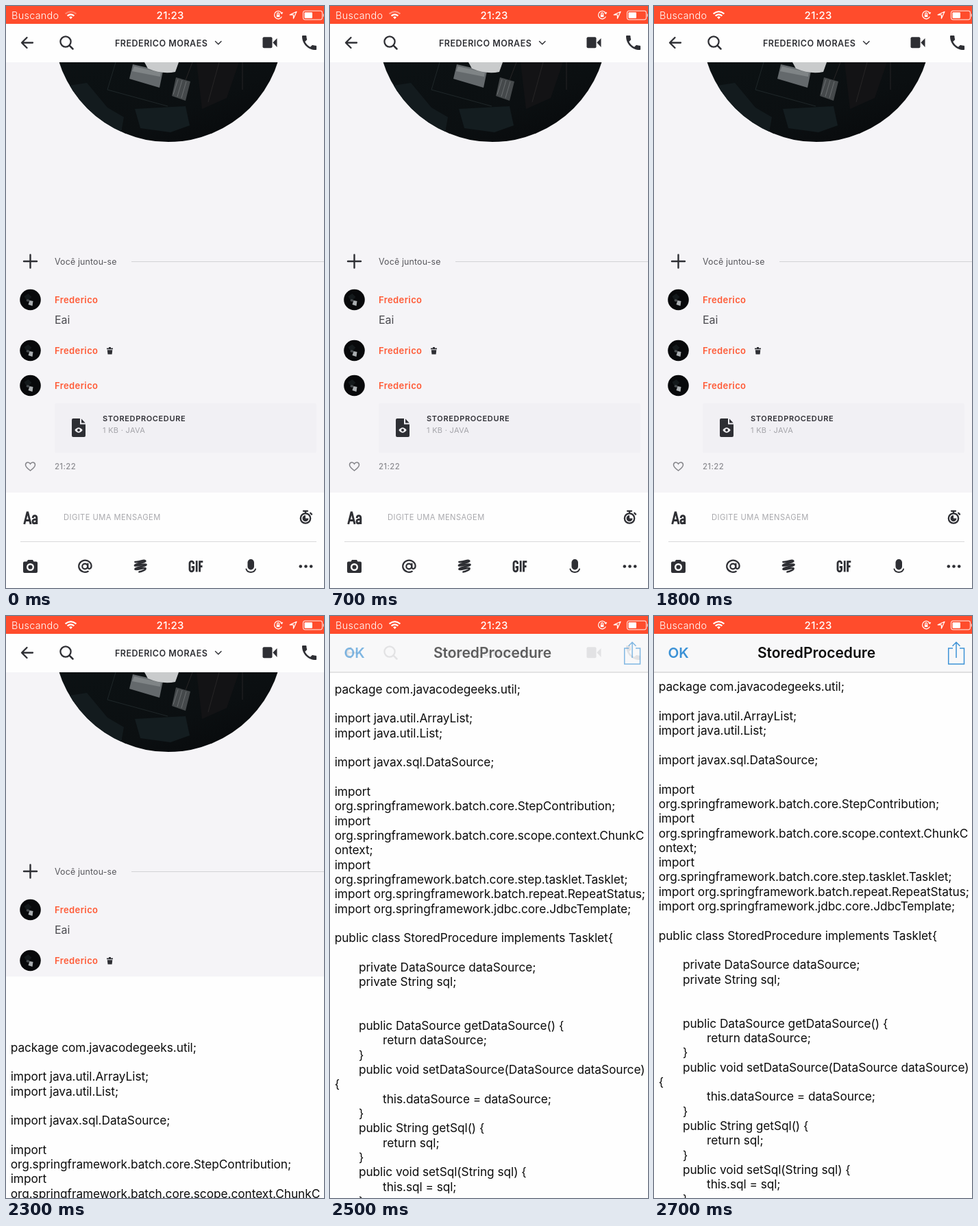
These frames come from a looping animation (464 px wide and 848 px high, 2800 ms). An HTML page:

```html
<!DOCTYPE html>
<html lang="pt">
<head>
<meta charset="utf-8">
<title>Chat</title>
<style>
html, body { margin: 0; width: 100%; height: 100%; overflow: hidden; background: #fff; }
svg { display: block; width: 464px; height: 848px; }
text { font-family: Inter, Roboto, sans-serif; font-optical-sizing: none; white-space: pre; }
.line { fill: none; stroke: #2e2f34; stroke-linecap: round; stroke-linejoin: round; }
.sharp { stroke-linecap: butt; stroke-linejoin: miter; }
.white { fill: none; stroke: #fff; }
.blue { fill: none; stroke: #3c92d6; stroke-width: 1.5; }
.ink { fill: #2e2f34; }
.name { font-size: 13px; font-weight: 600; letter-spacing: .4px; fill: #ff5a36; }
.code { font-size: 17.3px; letter-spacing: -.06px; fill: #0c0c0c; }
</style>
</head>
<body>
<svg viewBox="0 0 464 848" xmlns="http://www.w3.org/2000/svg">
  <defs>
    <clipPath id="disc"><circle cx="237" cy="30.4" r="167.7"/></clipPath>
    <linearGradient id="night" x1="0" y1="0" x2="1" y2="1">
      <stop offset="0" stop-color="#0c1214"/>
      <stop offset=".6" stop-color="#0b0f11"/>
      <stop offset="1" stop-color="#060709"/>
    </linearGradient>
    <g id="avatar">
      <circle r="15.3" fill="#08090b"/>
      <path d="M-9 -5L-3 -9L2 -4L-5 2Z" fill="#14191b"/>
      <path d="M-1 1L4 2L3 9L-3 7Z" fill="#a9adb0"/>
      <path d="M-5 -1L-1 0L-2 3L-6 2Z" fill="#484d50"/>
    </g>
  </defs>

  <rect width="464" height="848" fill="#f5f4f7"/>

  <g clip-path="url(#disc)">
    <rect x="60" y="60" width="350" height="145" fill="url(#night)"/>
    <path d="M92 116L118 112L148 148L172 162L168 184L120 168Z" fill="#131b1e"/>
    <path d="M188 150L262 146L268 174L240 184L196 178Z" fill="#141d20"/>
    <path d="M278 82L340 82L322 134L286 150Z" fill="#131315"/>
    <path d="M345 82L345 122M311 82L295 140M272 82L262 108" stroke="#272526" fill="none"/>
    <path d="M160 82L148 122L236 146" stroke="#1f2729" fill="none"/>
    <path d="M185 85L229 95L224 119L180 106Z" fill="#64696c"/>
    <path d="M187 88L226 97L225 103L184 95Z" fill="#7f8486"/>
    <path d="M202 82H252L247 96Q228 100 207 91Z" fill="#c9cbcc"/>
    <path d="M248 104L269 110L262 138L242 131Z" fill="#45494b"/>
    <path d="M251 107L244 129M257 108L250 132M263 110L256 134" stroke="#6a6e70" fill="none"/>
  </g>

  <path class="line" stroke-width="2.4" d="M26 372H45M35.5 362.5V381.5"/>
  <text x="71" y="377" font-size="12.4" letter-spacing=".15" fill="#56565b">Você juntou-se</text>
  <path d="M183 372.5H464" stroke="#d2d2d5"/>

  <use href="#avatar" x="35.5" y="428"/>
  <use href="#avatar" x="35.5" y="502"/>
  <use href="#avatar" x="35.5" y="553"/>
  <text class="name" x="71" y="432.5">Frederico</text>
  <text x="71" y="462.5" font-size="16" fill="#4a4a4f">Eai</text>
  <text class="name" x="71" y="506.5">Frederico</text>
  <path class="ink" d="M147 498.5H150V497H153V498.5H156V500.3H147ZM147.8 501.2H155.3L154.6 507.5H148.5Z"/>
  <text class="name" x="71" y="557.5">Frederico</text>

  <rect x="71" y="579" width="382" height="72" rx="2" fill="#f1f0f4"/>
  <path class="ink" d="M98 601H108V609.5H116V626Q116 628 114 628H98Q96 628 96 626V603Q96 601 98 601ZM110 601.5L115.7 607.5H110Z"/>
  <path d="M100.3 618Q106 610.5 111.7 618Q106 625.5 100.3 618Z" fill="#f4f3f6"/>
  <circle class="ink" cx="106" cy="618" r="2"/>
  <text x="141" y="605" font-size="11" font-weight="600" letter-spacing=".65" fill="#303036">STOREDPROCEDURE</text>
  <text x="141" y="621.5" font-size="11" letter-spacing=".3" fill="#a4a4a9">1 KB · JAVA</text>

  <path d="M35.5 677C31 673.5 28.5 671.5 28.5 668.7C28.5 664.5 33.5 663.6 35.5 667.2C37.5 663.6 42.5 664.5 42.5 668.7C42.5 671.5 40 673.5 35.5 677Z" fill="none" stroke="#85858a" stroke-width="1.5"/>
  <text x="71" y="674.8" font-size="11.3" font-weight="500" letter-spacing=".4" fill="#8b8b90">21:22</text>

  <rect y="709" width="464" height="139" fill="#fefefe"/>
  <path class="line sharp" stroke-width="2.9" d="M26.7 755L31 738H31.8L36.1 755M28.5 749.5H34.5M39.2 746Q39.4 742.6 42 742.6Q44.8 742.6 44.8 746V755M44.8 748Q39 747.6 39 751Q39 753.8 41.3 753.8Q43.6 753.8 44.8 751.3"/>
  <text x="84" y="748.7" font-size="11.2" letter-spacing=".42" fill="#a9a9ad">DIGITE UMA MENSAGEM</text>
  <g class="line" stroke-width="2.3">
    <circle cx="437" cy="746.5" r="7.2"/>
    <path d="M434 735.8H440M437 736V739M444.2 738.8L446 740.6"/>
    <path class="ink" stroke="none" d="M437 742V746.5H441.5A4.5 4.5 0 1 1 437 742Z"/>
  </g>
  <path d="M21 780.5H453" stroke="#d9d9db"/>

  <path class="ink" fill-rule="evenodd" d="M27 809.5H30.5L32 807H39L40.5 809.5H44Q46 809.5 46 811.5V824Q46 826 44 826H27Q25 826 25 824V811.5Q25 809.5 27 809.5ZM35.5 812A5.5 5.5 0 1 0 35.5 823A5.5 5.5 0 1 0 35.5 812Z"/>
  <circle class="ink" cx="35.5" cy="817.5" r="3.1"/>
  <g class="line" stroke-width="2.2">
    <circle cx="115.2" cy="816.5" r="3.9"/>
    <path d="M119.4 812.6V817.5Q119.6 820.4 122 820Q124.6 819.3 124.6 815.6A9.2 8.6 0 1 0 119.8 823.8"/>
  </g>
  <path class="line" stroke-width="2.7" d="M188.5 810C196 810.5 200 806.5 203 808.3S187 813.3 188 815.3S203.5 811.6 204.5 813.8S187.5 818.7 188.5 820.7S202.5 817.4 203.5 819.3S198 824 194.5 824.5"/>
  <path class="line sharp" stroke-width="2.8" d="M273.6 813V812A2.8 2.8 0 0 0 268 812V821A2.8 2.8 0 0 0 273.6 821V817.5H270.7M278.2 808.2V824.6M282.6 824.6V809.7H287.3M282.6 816.5H286.5"/>
  <rect class="ink" x="352.5" y="806" width="9.5" height="15.5" rx="4.7"/>
  <path class="line" stroke-width="2" d="M350.5 820.5Q352 825 357.2 825Q362.5 825 364 820.5"/>
  <g class="ink"><circle cx="429.8" cy="816.5" r="2.3"/><circle cx="437.5" cy="816.5" r="2.3"/><circle cx="445.2" cy="816.5" r="2.3"/></g>

  <g id="sheet">
    <rect width="464" height="860" fill="#fefefe"/>
    <g id="code"></g>
  </g>

  <rect y="26" width="464" height="56" fill="#fefefe"/>
  <g id="bar">
    <rect y="26" width="464" height="56" fill="#f8f8f9"/>
    <path d="M0 82H464" stroke="#c4c4c6"/>
  </g>

  <g id="chatHead">
    <path class="line" stroke-width="2.3" d="M39 53.5H23.5M30.5 46L23 53.5L30.5 61"/>
    <circle class="line" stroke-width="2.3" cx="87" cy="52" r="7.6"/>
    <path class="line" stroke-width="2.5" d="M92.6 57.6L97.5 62.5"/>
    <text x="226.7" y="58.5" font-size="12.5" font-weight="600" letter-spacing=".5" text-anchor="middle" fill="#2e2f34">FREDERICO MORAES</text>
    <path class="line" stroke-width="1.4" d="M305.5 51.5L309.8 55.8L314 51.5"/>
    <rect class="ink" x="374.5" y="45.3" width="14" height="16" rx="2"/>
    <path class="ink" d="M389.3 53.3L395.5 47V60Z"/>
    <path class="ink" transform="translate(428.5 39.5) scale(1.17)" d="M6.62 10.79c1.44 2.83 3.76 5.14 6.59 6.59l2.2-2.2c.27-.27.67-.36 1.02-.24 1.12.37 2.33.57 3.57.57.55 0 1 .45 1 1V20c0 .55-.45 1-1 1-9.39 0-17-7.61-17-17 0-.55.45-1 1-1h3.5c.55 0 1 .45 1 1 0 1.25.2 2.45.57 3.57.11.35.03.74-.25 1.02z"/>
  </g>

  <g id="fileHead">
    <text x="20.5" y="61.3" font-size="20.6" font-weight="600" fill="#3c92d6">OK</text>
    <text x="237" y="61.3" font-size="21" font-weight="600" text-anchor="middle" fill="#0a0a0a">StoredProcedure</text>
    <path class="blue" d="M436 47H429.7V70H452.5V47H446M441 61V38.5M435.5 43.8L441 38.3L446.5 43.8"/>
  </g>

  <rect width="464" height="26" fill="#ff4c2c"/>
  <text x="8" y="18.5" font-size="14.4" font-weight="300" letter-spacing=".3" fill="#fff">Buscando</text>
  <g class="white" stroke-width="2.1">
    <path id="wave" d="M86.6 11.4Q94.5 4.8 102.4 11.4"/>
    <path d="M89.6 14.4Q94.5 10.2 99.4 14.4"/>
    <path d="M92 16.2Q94.5 14.2 97 16.2L94.5 19Z" fill="#fff" stroke="none"/>
  </g>
  <text x="239.7" y="18.8" font-size="15" font-weight="500" letter-spacing=".3" text-anchor="middle" fill="#fff">21:23</text>
  <g class="white" stroke-width="1.2">
    <path d="M402.3 10.4A5.7 5.7 0 1 0 402.4 15.6M400.6 10.2L402.6 11.2L403.6 9"/>
    <rect x="394.8" y="12.5" width="4.6" height="3.6" fill="#fff" stroke="none"/>
    <path d="M395.6 12.5V11.4A1.5 1.5 0 0 1 398.6 11.4V12.5"/>
    <path d="M424 8.3L414.2 12.9H419.4V18.2Z" stroke-linejoin="round"/>
    <rect x="433.5" y="7.2" width="28" height="12.6" rx="2.8" stroke-opacity=".75"/>
    <rect x="435.5" y="9.2" width="11.5" height="8.6" rx="1" fill="#fff" stroke="none"/>
    <path d="M463.3 11.5V15.5" stroke-opacity=".75"/>
  </g>
</svg>
<script>
const LOOP = 2800, STEP = 100, LINE = 21.32, INDENT = 35.2;
const el = id => document.getElementById(id);
const clamp = v => Math.max(0, Math.min(1, v));
const show = (id, amount) => el(id).setAttribute("opacity", clamp(amount));

// Each leading ">" is one indent.
const source = `package com.javacodegeeks.util;

import java.util.ArrayList;
import java.util.List;

import javax.sql.DataSource;

import
org.springframework.batch.core.StepContribution;
import
org.springframework.batch.core.scope.context.ChunkC
ontext;
import
org.springframework.batch.core.step.tasklet.Tasklet;
import org.springframework.batch.repeat.RepeatStatus;
import org.springframework.jdbc.core.JdbcTemplate;

public class StoredProcedure implements Tasklet{

>private DataSource dataSource;
>private String sql;


>public DataSource getDataSource() {
>>return dataSource;
>}
>public void setDataSource(DataSource dataSource)
{
>>this.dataSource = dataSource;
>}
>public String getSql() {
>>return sql;
>}
>public void setSql(String sql) {
>>this.sql = sql;
>}`;

source.split("\n").forEach((row, i) => {
  const depth = row.match(/^>*/)[0].length;
  const text = document.createElementNS("http://www.w3.org/2000/svg", "text");
  text.setAttribute("class", "code");
  text.setAttribute("x", 6.7 + depth * INDENT);
  text.setAttribute("y", 109.3 + i * LINE);
  text.textContent = row.slice(depth);
  el("code").append(text);
});

// Critically damped spring from the bottom edge to the top.
function sheetTop(t) {
  const k = Math.max(0, t - 2258.2) * .0316;
  return 848 * (1 + k) * Math.exp(-k);
}

function draw(ms) {
  const t = Math.floor((ms % LOOP) / STEP) * STEP;
  el("sheet").setAttribute("transform", `translate(0 ${sheetTop(t).toFixed(2)})`);
  show("chatHead", (2520 - t) / 200);
  show("bar", (t - 2320) / 200);
  show("fileHead", (t - 2340) / 250);
  show("wave", .3 + .7 * (t / 1800) ** 1.6);
}

let start;
function tick(now) {
  start ??= now;
  draw(now - start);
  requestAnimationFrame(tick);
}
draw(0);
requestAnimationFrame(tick);
</script>
</body>
</html>
```
